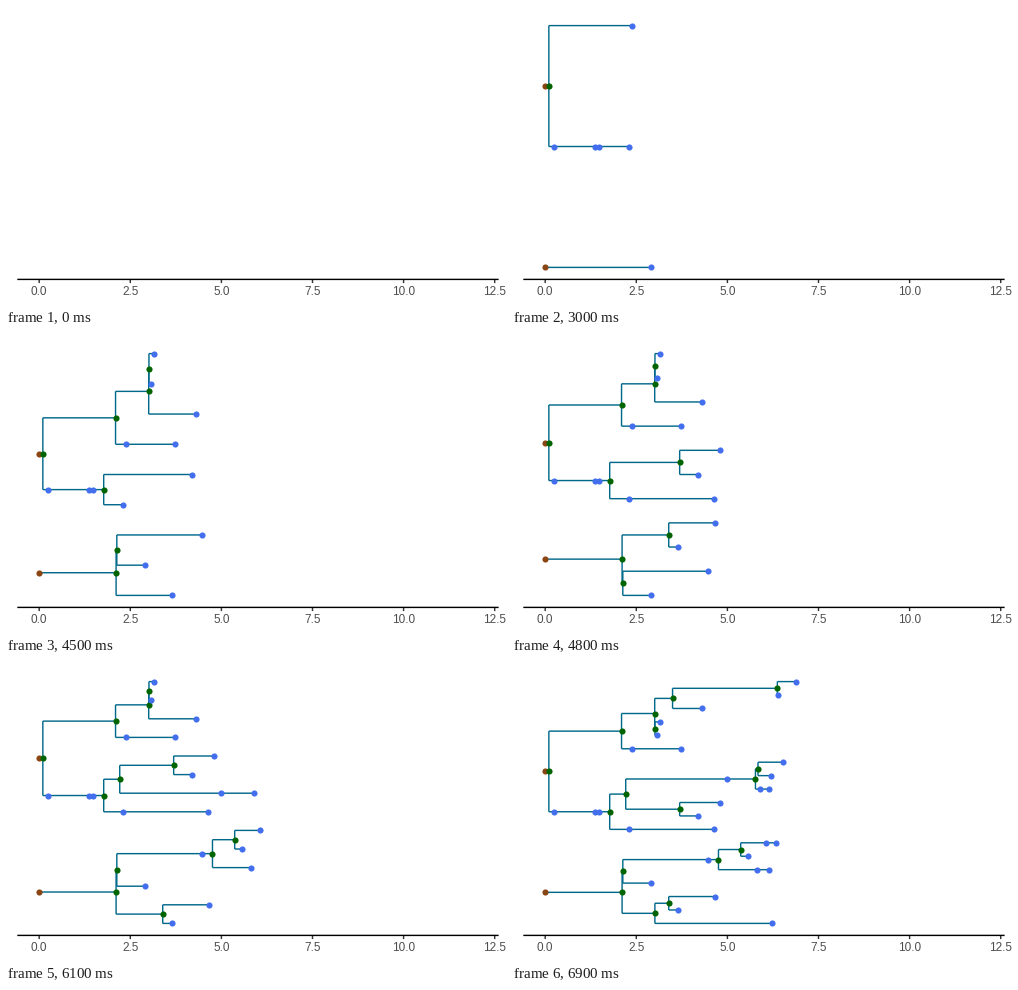
A matplotlib script for the animation above (8 s loop, 500x300 px).

```python
import numpy as np
import matplotlib.pyplot as plt
from matplotlib.animation import FuncAnimation
from matplotlib.collections import LineCollection

WIDTH, HEIGHT, DPI = 500, 300, 100
PT = 72 / DPI  # points per pixel
FRAMES, INTERVAL = 80, 100
X0, X_UNIT = 33.2, 36.44
TOP, BOTTOM = 19.6, 261.4
AXIS_Y = 273.4
LINE_WIDTH = 1.42 * PT
COLORS = {"root": "#8B4513", "split": "#006400", "sample": "#436EEE"}


def lineage(*samples, split=None, kids=()):
    return {"samples": list(samples), "split": split, "kids": list(kids)}


def fork(time, left, right, *samples):
    return lineage(*samples, split=time, kids=(left, right))


tip = lineage

clade_a = fork(
    1.77,
    fork(2.21,
         fork(5.77,
              fork(5.84, tip(6.535), tip(6.205)),
              tip(5.89, 6.13),
              4.98),
         fork(3.69, tip(4.79), tip(4.203))),
    tip(2.29, 4.63),
    0.23, 1.36, 1.49)

clade_b = fork(
    2.095,
    fork(3.005,
         fork(3.495, fork(6.37, tip(6.895), tip(6.385)), tip(4.29)),
         fork(3.012, tip(3.15), tip(3.075))),
    tip(2.385, 3.715))

clade_c = fork(
    2.11,
    fork(2.13,
         fork(4.755,
              fork(5.365, tip(6.055, 6.32), tip(5.565)),
              tip(5.81, 6.15),
              4.46),
         tip(2.91)),
    fork(3.01, fork(3.39, tip(4.655), tip(3.645)), tip(6.23)))

ROOTS = [fork(0.1, clade_b, clade_a), clade_c]


def rank(branch):
    """Bigger clades first, then those sampled most recently."""
    return -branch["tips"], -branch["first"]


def prune(branch, now):
    """Keep what has been sampled by now, joining one-way splits."""
    samples = [t for t in branch["samples"] if t <= now]
    kids = [k for k in (prune(kid, now) for kid in branch["kids"]) if k]
    split = branch["split"]
    if len(kids) == 1:
        samples += kids[0]["samples"]
        split, kids = kids[0]["split"], kids[0]["kids"]
    elif not kids:
        split = None
    if not samples and not kids:
        return None
    return {
        "samples": samples,
        "split": split,
        "kids": sorted(kids, key=rank),
        "tips": sum(k["tips"] for k in kids) or 1,
        "first": min(samples + [k["first"] for k in kids]),
    }


def x_at(time):
    return X0 + X_UNIT * time


def place(branch, start, rows, lines, dots):
    """Lay out a branch and return its height on the stage."""
    end = branch["split"]
    if end is None:
        y, end = next(rows), branch["samples"][-1]
    else:
        ys = [place(k, end, rows, lines, dots) for k in branch["kids"]]
        y = sum(ys) / len(ys)
        lines.append([(x_at(end), ys[0]), (x_at(end), ys[-1])])
        dots["split"].append((x_at(end), y))
    lines.append([(x_at(start), y), (x_at(end), y)])
    dots["sample"] += [(x_at(t), y) for t in branch["samples"]]
    return y


def layout(now):
    lines, dots = [], {kind: [] for kind in COLORS}
    trees = [t for t in (prune(root, now) for root in ROOTS) if t]
    trees.sort(key=rank)
    count = sum(t["tips"] for t in trees)
    if count == 1:
        rows = iter([(TOP + BOTTOM) / 2])
    else:
        rows = iter(np.linspace(TOP, BOTTOM, count))
    for tree in trees:
        y = place(tree, 0, rows, lines, dots)
        dots["root"].append((X0, y))
    return lines, dots


fig = plt.figure(figsize=(WIDTH / DPI, HEIGHT / DPI), dpi=DPI, facecolor="white")
ax = fig.add_axes([0, 0, 1, 1])
ax.set(xlim=(0, WIDTH), ylim=(HEIGHT, 0))
ax.axis("off")

ticks = np.arange(0, 12.6, 2.5)
for t in ticks:
    ax.plot([x_at(t)] * 2, [AXIS_Y, AXIS_Y + 3.67], color="#333333",
            lw=LINE_WIDTH, solid_capstyle="butt", snap=False)
    ax.text(x_at(t), 289, f"{t:.1f}", ha="center", va="baseline",
            family="Liberation Sans", size=11.73 * PT, color="#4D4D4D")
ax.plot([11.3, 492.6], [AXIS_Y] * 2, color="black", lw=LINE_WIDTH,
        solid_capstyle="butt", snap=False)

branches = LineCollection([], colors="#00688B", linewidths=LINE_WIDTH,
                          capstyle="butt", snap=False, zorder=3)
ax.add_collection(branches, autolim=False)
markers = {
    kind: ax.scatter([], [], s=(6.15 * PT) ** 2, color=color, linewidths=0,
                     snap=False, zorder=4 + i)
    for i, (kind, color) in enumerate(COLORS.items())
}


def update(frame):
    lines, dots = layout(frame * INTERVAL / 1000 + 1e-9)
    branches.set_segments(lines)
    for kind, marker in markers.items():
        marker.set_offsets(np.reshape(dots[kind], (-1, 2)))
    return [branches, *markers.values()]


animation = FuncAnimation(fig, update, frames=FRAMES, interval=INTERVAL,
                          init_func=lambda: update(0), repeat=True,
                          repeat_delay=0)
plt.show()
```
